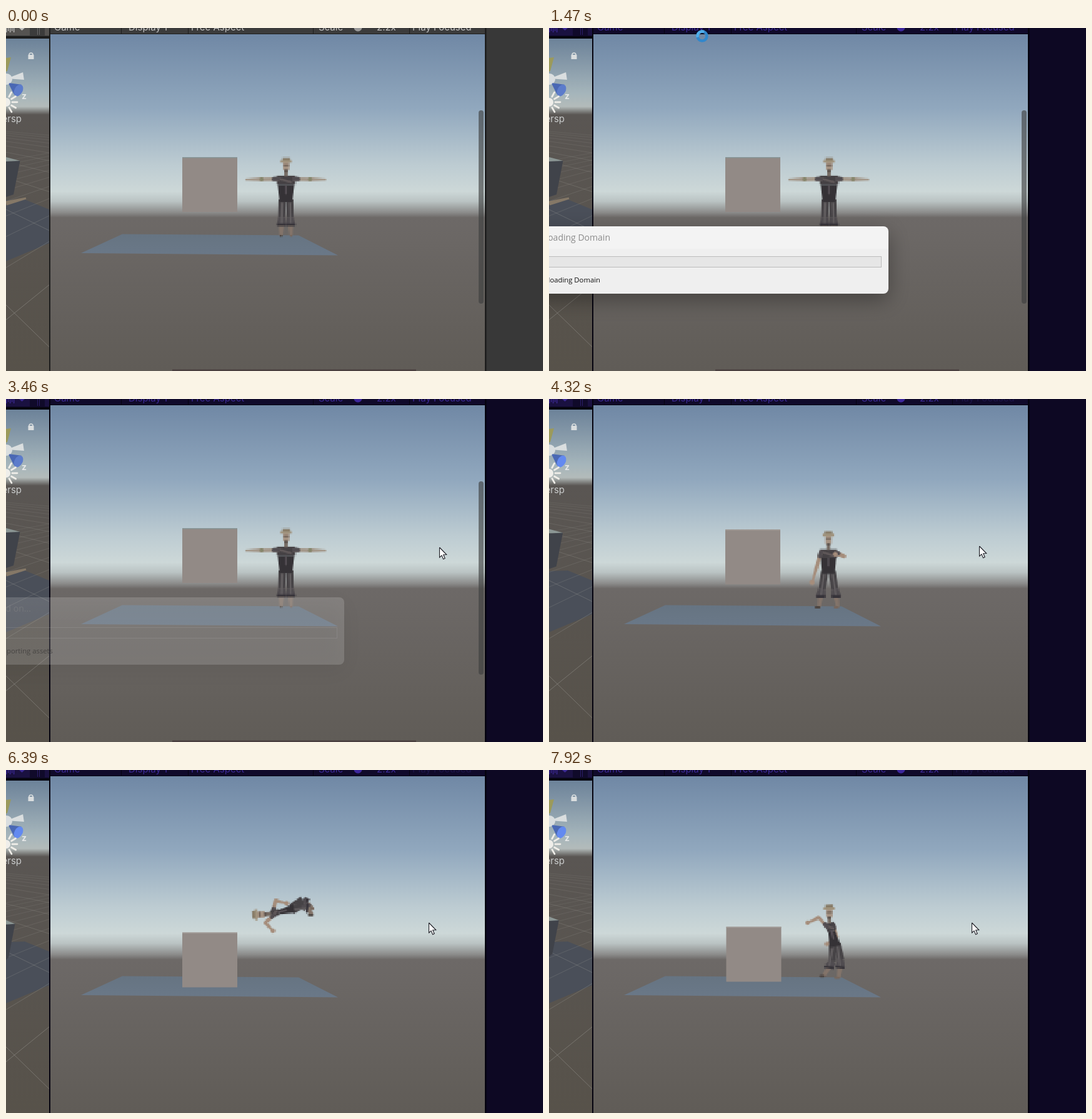
These frames come from a looping animation (859 by 550 pixels, 7.99 s). An HTML page with a canvas:

```html
<!DOCTYPE html>
<html lang="en">
<head>
<meta charset="utf-8">
<title>Editor play mode</title>
<style>
html, body { margin: 0; width: 100%; height: 100%; overflow: hidden; background: #383838; }
canvas { display: block; }
</style>
</head>
<body>
<canvas id="stage" width="859" height="550"></canvas>
<script>
const LOOP = 7990, RELOAD = 1290, START = 4120, ANIMATE = 4200;
const PX = 2.2, OX = 370, OY = 180;
const UI = '15px Inter, sans-serif';

const c = document.getElementById('stage').getContext('2d');
const small = document.createElement('canvas');
small.width = 73;
small.height = 80;
const s = small.getContext('2d');

const clamp = v => Math.max(0, Math.min(1, v));
const ramp = (t, a, b) => clamp((t - a) / (b - a));
const ease = v => v * v * (3 - 2 * v);
const bump = (t, mid, half) => ease(clamp(1.15 - Math.abs(t - mid) / half));
const mix = (a, b, k) => a + (b - a) * k;
const mixPoint = (a, b, k) => a.map((v, i) => mix(v, b[i], k));
// Point at a distance from p; angle 0 is up, positive leans right.
const toward = ([x, y], angle, d) => [x + Math.sin(angle) * d, y - Math.cos(angle) * d];

function rect(x, y, w, h, fill) {
  c.fillStyle = fill;
  c.fillRect(x, y, w, h);
}
function poly(g, pts, fill) {
  g.beginPath();
  for (const p of pts) g.lineTo(...p);
  g.closePath();
  g.fillStyle = fill;
  g.fill();
}
function line(g, pts, color, width) {
  g.beginPath();
  for (const p of pts) g.lineTo(...p);
  g.strokeStyle = color;
  g.lineWidth = width;
  g.stroke();
}
function taper(g, a, b, wa, wb, fill) {
  const d = Math.atan2(b[0] - a[0], a[1] - b[1]) + Math.PI / 2;
  poly(g, [toward(a, d, wa / 2), toward(b, d, wb / 2), toward(b, d, -wb / 2), toward(a, d, -wa / 2)], fill);
}
function dot(g, x, y, r, fill) {
  g.beginPath();
  g.arc(x, y, r, 0, 7);
  g.fillStyle = fill;
  g.fill();
}
function arc(x, y, r, from, to, color, width) {
  c.beginPath();
  c.arc(x, y, r, from, to);
  c.strokeStyle = color;
  c.lineWidth = width;
  c.stroke();
}
function text(str, x, y, font, fill, align = 'left') {
  c.font = font;
  c.textAlign = align;
  c.fillStyle = fill;
  c.fillText(str, x, y);
}
function gradient(y0, y1, stops) {
  const g = c.createLinearGradient(0, y0, 0, y1);
  for (const [y, color] of stops) g.addColorStop((y - y0) / (y1 - y0), color);
  return g;
}

const gameFill = gradient(10, 550, [
  [10, '#7088a5'], [130, '#91a8be'], [220, '#bdccd2'], [262, '#cdd8d8'],
  [278, '#bac3c3'], [296, '#8b8b8a'], [304, '#6d6967'], [550, '#605c57']
]);
const sceneFill = gradient(17, 550, [
  [17, '#6c8299'], [105, '#a5b5bb'], [126, '#b3bbba'], [139, '#5a5653'], [550, '#57524a']
]);
const matFill = gradient(330, 365, [[330, '#667482'], [365, '#6a7888']]);
const dialogFill = gradient(318, 426, [[318, '#f3f3f3'], [354, '#f3f3f3'], [354, '#efefef'], [426, '#efefef']]);

// legs: angle, length, spread. hands: offsets from the neck.
const REST = { hip: [448, 275], lean: [0], legs: [Math.PI, 58, 8], width: [15], left: [-65, 6], right: [64, 6] };
const IDLE = { hip: [447, 276], lean: [0], legs: [Math.PI, 58, 15], width: [14], left: [-26, 53], right: [11, 8] };
const GUARD = { hip: [457, 279], lean: [-0.24], legs: [3.25, 53, 12], width: [7], left: [-35, 0], right: [-4, 34] };
const SWING = { hip: [456, 280], lean: [-0.3], legs: [Math.PI, 51, 8], width: [14], left: [-33, 4], right: [44, 43] };
const LEAP = { hip: [457, 223], lean: [-1.8], legs: [1.7, 34, 5], width: [5], left: [4, 27], right: [26, -17] };

function blend(a, b, k) {
  const out = {};
  for (const key in a) out[key] = mixPoint(a[key], b[key], k);
  return out;
}
function poseAt(t) {
  if (t < ANIMATE) return REST;
  const ready = blend(IDLE, GUARD, ease(ramp(t, 4600, 5000)));
  const struck = blend(ready, SWING, bump(t, 5320, 420));
  return blend(struck, LEAP, bump(t, 6420, 500));
}
// Middle joint of a limb: the shorter its reach, the more it bends.
function bend(a, b, length, side) {
  const dx = b[0] - a[0], dy = b[1] - a[1], d = Math.hypot(dx, dy) || 1;
  const out = side * 0.3 * Math.sqrt(Math.max(0, length ** 2 - d * d)) / d;
  return [(a[0] + b[0]) / 2 + dy * out, (a[1] + b[1]) / 2 - dx * out];
}

function drawFigure(t) {
  const pose = poseAt(t), hip = pose.hip, [lean] = pose.lean, [w] = pose.width;
  const neck = toward(hip, lean, 35 + (t < ANIMATE ? 3 : 0));
  const across = lean + Math.PI / 2;
  const [legAngle, legLength, spread] = pose.legs;
  const heel = toward(hip, legAngle, legLength);
  const chest = toward(neck, lean, -5);
  const skin = t < ANIMATE ? '#a29587' : '#a58d7b';

  s.setTransform(1, 0, 0, 1, 0, 0);
  s.clearRect(0, 0, 73, 80);
  s.setTransform(1 / PX, 0, 0, 1 / PX, -OX / PX, -OY / PX);
  s.lineCap = s.lineJoin = 'round';

  function arm(side, offset) {
    const shoulder = toward(chest, across, side * (w - 2));
    const hand = [neck[0] + offset[0], neck[1] + offset[1]];
    const elbow = bend(shoulder, hand, 50, side < 0 && t > ANIMATE ? -1 : 1);
    line(s, [shoulder, elbow], skin, 5.5);
    taper(s, elbow, hand, 6, 3, skin);
    line(s, [shoulder, mixPoint(shoulder, elbow, 0.25)], '#514c50', 7);
    if (t < ANIMATE) dot(s, elbow[0], elbow[1], 3, '#85856a');
    else dot(s, hand[0], hand[1], 4, skin);
  }
  function leg(side) {
    const foot = toward(heel, legAngle - Math.PI / 2, side * spread);
    const top = toward(hip, across, side * Math.min(6, w / 2));
    const knee = bend(top, foot, 58, 1);
    const cuff = mixPoint(knee, foot, 0.4);
    taper(s, cuff, foot, 8, 5, '#83746a');
    taper(s, top, knee, 12, 11, '#464346');
    taper(s, knee, cuff, 11, 16, '#504c50');
    line(s, [mixPoint(top, knee, 0.2), cuff], '#625e60', 3);
    const flat = toward(cuff, legAngle - Math.PI / 2, 6);
    line(s, [flat, toward(flat, legAngle - Math.PI / 2, -12)], '#353238', 3.5);
    line(s, [foot, [foot[0] - (t < ANIMATE ? 0 : 5), foot[1]]], side < 0 ? '#4d4541' : '#77675d', 4);
  }

  leg(1);
  leg(-1);
  if (w < 10) arm(1, pose.right);
  taper(s, neck, toward(neck, lean, -14), w * 2, w * 2, '#454144');
  taper(s, toward(neck, lean, -14), toward(hip, lean, -4), w * 2 - 3, Math.min(20, w * 2 + 4), '#353236');
  line(s, [toward(chest, across, -w * 0.6), toward(toward(chest, lean, -5), across, w * 0.5)], '#625a5b', 3.5);
  line(s, [mixPoint(neck, hip, 0.4), mixPoint(neck, hip, 0.75)], '#575157', 3);
  if (w >= 10) arm(1, pose.right);
  arm(-1, pose.left);

  const tilt = lean * Math.abs(lean) / 2;
  s.save();
  s.translate(...toward(neck, tilt, 18));
  s.rotate(tilt);
  const bar = (x, y, h, fill) => {
    s.fillStyle = fill;
    s.fillRect(-x, y, 2 * x, h);
  };
  bar(3, 8, 11, '#756a62');
  bar(5, -4, 13, '#a59282');
  bar(4.5, 0, 2.5, '#6d6056');
  bar(3, 8, 4, '#5d544e');
  bar(6, -11, 7, '#867a66');
  bar(9, -7, 4, '#a0937d');
  s.restore();

  c.imageSmoothingEnabled = false;
  c.drawImage(small, OX, OY, 73 * PX, 80 * PX);
}

// How far the cube sits below its starting height.
const cubeDrop = t => 53.5 * ramp(t, 4250, 4600) ** 2 - 0.03 * Math.max(0, t - 7620);

function drawGame(t) {
  rect(71, 10, 695, 540, gameFill);
  poly(c, [[186, 330.5], [468, 332.5], [531, 364.5], [120, 361]], matFill);
  const y = 207 + cubeDrop(t), x = 282 + 1.5 * ramp(t, 7620, 7920);
  rect(x, y, 88, 88, '#928a86');
  rect(x, y, 88, 1.5, t < ANIMATE ? '#879698' : '#a39d99');
  drawFigure(t);
  if (t < START) {
    c.beginPath();
    c.roundRect(756, 132, 8, 310, 4);
    c.fillStyle = 'rgba(60,62,62,.62)';
    c.fill();
    rect(266, 547.5, 390, 2.5, '#4a4040');
  }
}

function drawGizmo(t) {
  const pale = '#dadedf';
  rect(35.5, 43, 9, 7, pale);
  arc(40, 43, 3, Math.PI, 0, pale, 1.6);
  poly(c, [[0, 48], [8, 47], [2, 69], [0, 70]], '#9b9a5b');
  taper(c, [8, 80], [28, 77], 3, 12, pale);
  dot(c, 1, 82, 9, pale);
  taper(c, [5, 89], [19, 99], 2, 20, '#4a68b4');
  c.beginPath();
  c.ellipse(20, 100, 6.5, 10, 0.5, 0, 7);
  c.fillStyle = t < START ? '#5c7ccb' : '#638af0';
  c.fill();
  text('z', 25, 114, 'bold 14px Inter, sans-serif', '#e6e8e8');
  dot(c, 0, 119, 7, '#efeeea');
  c.lineCap = 'round';
  for (let a = 0.5; a < 2.8; a += 0.53) {
    line(c, [toward([0, 119], a, 10), toward([0, 119], a, 18)], '#f0eee9', 2.8);
  }
  text('Persp', 25, 151, UI, '#c9cbcb', 'right');
}

function drawScene(t) {
  c.save();
  c.beginPath();
  c.rect(0, 17, 69, 533);
  c.clip();
  rect(0, 17, 69, 533, sceneFill);
  poly(c, [[0, 276], [30, 275], [69, 291], [69, 345], [0, 374]], '#4a4f59');
  for (let k = 1; k < 12; k++) {
    const a = 306 / k, b = 330 / (1 + (k - 1) * 0.34);
    const shade = `rgba(165,163,158,${0.42 / Math.sqrt(k)})`;
    line(c, [[0, 138 + a], [69, 138 + a * 1.22]], shade, 1);
    line(c, [[0, 138 + b], [69, 138 + b * 0.83]], shade, 1);
  }

  const d = cubeDrop(t), x = 22.5 - d * 0.15, y = 213 + d * 0.63;
  poly(c, [[0, y - 6], [x, y], [x - 3, y + 2.5], [0, y + 1]], '#8b9694');
  poly(c, [[0, y + 1], [x, y], [x - 10.5, y + 54], [0, y + 58]], '#40434a');
  if (t < ANIMATE) {
    taper(c, [0, 281], [32, 273], 7, 3, '#857867');
  } else if (bump(t, 5320, 420) > 0.5) {
    taper(c, [0, 313], [40, 319], 9, 7, '#9c826b');
    dot(c, 41, 318, 6, '#a58a72');
  }
  drawGizmo(t);
  c.restore();
}

function drawFrame(t) {
  const play = t >= RELOAD;
  const [panel, bar, edge, ink, button] = play
    ? ['#0d0823', '#100a2a', '#05030f', '#3c2a96', '#1a1140']
    : ['#383838', '#3c3c3c', '#1d1d1d', '#c2c2c2', '#555351'];
  rect(0, 0, 859, 550, panel);
  rect(0, 0, 766, 17, bar);
  rect(0, 13, 69, 4, edge);
  rect(0, 0, 38, 12, button);
  rect(62, 0, 7, 12, button);
  for (let i = 0; i < 5; i++) rect(i * 3, 0, 1.3, 7 - (i % 2) * 2, ink);
  poly(c, [[21, 0], [30, 0], [25.5, 4]], ink);
  for (const x of [50, 53]) rect(x, 0, 1, 11, play ? '#2a1d66' : '#6a6a6a');
  for (const x of [184, 291, 491, 645]) rect(x, 0, 1, 10, edge);
  const labels = { Game: 77, 'Display 1': 196, 'Free Aspect': 296, Scale: 500, '2.2x': 593, 'Play Focused': 650 };
  for (const name in labels) {
    text(name, labels[name], 3.5, UI, t >= START && name === 'Play Focused' ? '#1d1548' : ink);
  }
  dot(c, 563, -1, 6.5, play ? '#3d279c' : '#999');
  rect(71, 9, 695, 1, edge);
  rect(69, 0, 2, 550, edge);
  rect(766, 0, 2.5, 550, edge);
}

function drawDialog(t) {
  const alpha = ramp(t, 1320, 1440) * (1 - ramp(t, 3370, 3480));
  if (!alpha) return;
  const late = t >= 2900;
  c.save();
  c.translate(-2 * ramp(t, 3370, 3460), 0);
  c.globalAlpha = alpha;
  c.shadowColor = 'rgba(0,0,0,.34)';
  c.shadowBlur = 34;
  c.shadowOffsetY = 10;
  c.beginPath();
  c.roundRect(-60, 318, 603, 108, 8);
  c.fillStyle = dialogFill;
  c.fill();
  c.shadowColor = 'transparent';
  rect(-60, 366, 592, 18, 'rgba(0,0,0,.04)');
  c.lineWidth = 1;
  c.strokeStyle = '#bcbcbc';
  c.strokeRect(-60, 366.5, 591.5, 17);
  c.globalAlpha = Math.sqrt(alpha);
  const face = '"Open Sans", sans-serif';
  text(late ? 'Hold on...' : 'Reloading Domain', late ? 42 : 98, 341, '14px ' + face, '#8c8c8c', 'right');
  text(late ? 'Importing assets' : 'Reloading Domain', late ? 77 : 82, 408, '11.3px ' + face, '#111', 'right');
  c.restore();
}

// Each glide: start, end, destination.
const GLIDES = [
  [200, 730, [240, 4]], [1560, 2040, [690, 226]], [3100, 3400, [693, 238]],
  [3730, 3920, [688, 236]], [4330, 4800, [676, 245]]
];
function drawCursor(t) {
  if (t < 200) return;
  let pos = [701, 479];
  for (const [from, to, goal] of GLIDES) pos = mixPoint(pos, goal, ease(ramp(t, from, to)));
  const flick = bump(t, 3825, 95);
  c.save();
  c.translate(pos[0] - 14 * flick, pos[1] - 22 * flick);
  if (t >= RELOAD && t < 3250) {
    arc(5, 9, 7.5, 0, 7, '#3187cc', 4.5);
    arc(5, 9, 7.5, t / 160, t / 160 + 2.2, '#50aeea', 4.5);
  } else {
    const arrow = [[0.5, 0], [0.5, 16], [4, 12.8], [6.6, 18.7], [9.2, 17.5], [6.7, 11.8], [11.7, 11.6], [0.5, 0]];
    poly(c, arrow, '#fff');
    line(c, arrow, '#1c1c24', 1.1);
  }
  c.restore();
}

function render(t) {
  for (const draw of [drawFrame, drawScene, drawGame, drawDialog, drawCursor]) draw(t);
}
function loop() {
  render(performance.now() % LOOP);
  requestAnimationFrame(loop);
}
loop();
</script>
</body>
</html>
```
